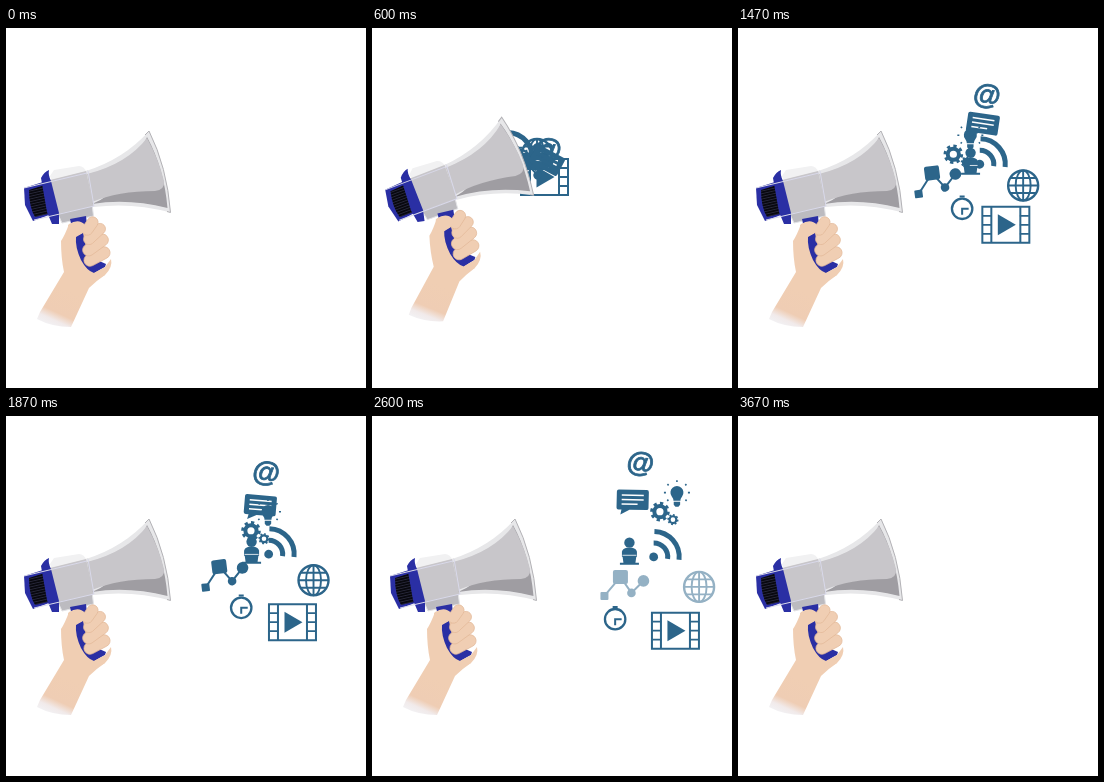
These frames come from a looping animation (360 by 360 pixels, 4070 ms). An HTML page:

```html
<!DOCTYPE html>
<html lang="en">
<head>
<meta charset="utf-8">
<title>Megaphone</title>
<style>
  html, body { margin: 0; width: 100%; height: 100%; overflow: hidden; background: #fff; }
  svg { display: block; width: 100vw; height: 100vh; }
  #icons { --ink: #2c658a; fill: var(--ink); stroke: none; }
  .line { fill: none; stroke: var(--ink); }
  .paper { fill: none; stroke: #fff; }
  .blue { fill: #2a2fa4; }
  #at text { font: bold 28px "Liberation Sans", Arial, sans-serif; text-anchor: middle; stroke: var(--ink); stroke-width: .8px; }
  #icons > g { opacity: 0; }
</style>
</head>
<body>
<svg viewBox="0 0 360 360">
  <defs>
    <linearGradient id="skin" gradientUnits="userSpaceOnUse" x1="62" y1="262" x2="46" y2="297">
      <stop offset="0" stop-color="#f0ceb3"/>
      <stop offset=".65" stop-color="#efcdb4"/>
      <stop offset=".86" stop-color="#f1eaea"/>
      <stop offset="1" stop-color="#f2f0f2"/>
    </linearGradient>
    <pattern id="grille" width="4" height="2.6" patternUnits="userSpaceOnUse" patternTransform="rotate(-13)">
      <rect width="4" height="2.6" fill="#08080f"/>
      <rect width="4" height=".6" fill="#34344c"/>
    </pattern>
    <mask id="lines" maskUnits="userSpaceOnUse" x="-20" y="-20" width="40" height="40">
      <rect x="-20" y="-20" width="40" height="40" fill="#fff"/>
      <path stroke="#000" stroke-width="1.5" d="M-11-6.5H11M-11-2H11M-11 2.5H5"/>
    </mask>
  </defs>

  <g id="icons">
    <g id="film">
      <path class="line" stroke-width="2" d="M-23.5-18H23.5V18H-23.5ZM-14.5-18V18M14.5-18V18"/>
      <path class="line" stroke-width="1.8" d="M-23-9h9M-23 0h9M-23 9h9M14-9h9M14 0h9M14 9h9"/>
      <path d="M-8-10.500 10 0-8 10.500Z"/>
    </g>
    <g id="globe">
      <g class="line" stroke-width="1.900">
        <circle r="15" stroke-width="2.400"/>
        <ellipse rx="7.500" ry="15"/>
        <path d="M0-15V15M-15 0H15M-13-7.500H13M-13 7.500H13"/>
      </g>
    </g>
    <g id="at"><text y="8">@</text></g>
    <g id="net">
      <path class="line" stroke-width="2" d="M-16 19 0 0 11 16 23 4"/>
      <rect x="-20" y="15" width="8" height="8" rx="1"/>
      <rect x="-7.500" y="-7" width="15" height="14" rx="2"/>
      <circle cx="11" cy="16" r="4.300"/>
      <circle cx="23" cy="4" r="5.800"/>
    </g>
    <g id="clock">
      <circle class="line" r="10.200" stroke-width="2.300"/>
      <path class="line" stroke-width="2" d="M0 6V0H6.500M-2.500-12.300H2.500"/>
    </g>
    <g id="wifi">
      <circle r="4.400"/>
      <path class="line" stroke-width="5" d="M-1-14A14 14 0 0 1 14 1M-1-25.500A25.500 25.500 0 0 1 25.500 1"/>
    </g>
    <g id="person">
      <circle cy="-8" r="5.200"/>
      <path d="M-7.500 6V1Q-7-2-3-3H3Q7-2 7.500 1V6Z"/>
      <path d="M-7 5H7L6 12H9.500V14H-9.500V12H-6Z"/>
      <path class="paper" stroke-width=".8" d="M-7 4.600H7"/>
    </g>
    <g id="idea">
      <circle class="line" r="5.600" stroke-width="4"/>
      <circle class="line" r="8.300" stroke-width="3" pathLength="16" stroke-dasharray="1"/>
      <g transform="translate(13 8)">
        <circle class="line" r="3.400" stroke-width="2.200"/>
        <circle class="line" r="4.800" stroke-width="1.600" pathLength="16" stroke-dasharray="1"/>
      </g>
      <g transform="translate(17 -19)">
        <path d="M-3.500 8Q-3.500 6-5.300 3.600A6.500 6.500 0 1 1 5.300 3.600Q3.500 6 3.500 8ZM-3.200 9H3.200V12L1.500 14H-1.500L-3.200 12Z"/>
        <path class="line" stroke-width="1.600" d="M-13 0h2M-9.500-8.500l1.200 1.200M0-12.500v1.800M9.500-8.500 8.300-7.300M11 0h2M8.500 7l1.200 1.200M-8.500 7l-1.200 1.200"/>
      </g>
    </g>
    <g id="chat">
      <path mask="url(#lines)" d="M-14-12H14Q16-12 16-10V6Q16 8 14 8H-3L-12 13-11 8H-14Q-16 8-16 6V-10Q-16-12-14-12Z"/>
    </g>
  </g>

  <g id="horn">
    <path fill="#f1f1f2" d="M44 148 48 142 73 138Q78 138 81 145L46 153Z"/>
    <path fill="#bcbbc0" stroke="#e3e3e6" d="M51 184 86 176 87.500 188 56 195Z"/>
    <path fill="#c8c6ca" d="M44 152 82 142.500 89 178 51 186Z"/>
    <path fill="#e7e7e9" d="M80 143Q118 131 143 103Q161 139 164.500 184.500Q126 174 88 179Z"/>
    <path fill="#9f9da2" d="M86 176Q118 164 141 109Q158 140 161.500 180Q122 170 86 176Z"/>
    <path fill="#c8c6ca" d="M81 146Q121 136 141 110Q153 132 158 153Q159 162 149 163Q112 163 86 174Z"/>
    <path fill="none" stroke="#b3b2b6" stroke-width="1" d="M139 107 143 103Q161 139 164.500 184.500L161 183.500"/>
    <path class="blue" d="M18 160 37 154 43 187 27 193 19 177Z"/>
    <path fill="url(#grille)" d="M23 162 37 157.500 42 186 29 189Q23 179 23 162Z"/>
    <path class="blue" d="M35 150Q38 144 43 142Q42 147 45 153L53 185 53 196 46 196 41 184Z"/>
    <path fill="none" stroke="#d9d9ea" stroke-width="1" d="M18 160 81 145M28 192 88 178M82 143 88 178"/>
  </g>

  <g id="hand">
    <path class="blue" d="M64 191 80 188 81 197 66 200Z"/>
    <path fill="url(#skin)" d="M63 196Q73 190 79 197L83 202 92 242 99 247Q90 253 83 260L65 299Q46 299 31 291L34 284 58 244Q55 230 55 213Q59 207 63 196Z"/>
    <path class="blue" d="M70 209 77 205 82 228 100 236 99 239 88 245Q81 243 75 232Q69 219 70 209Z"/>
    <g fill="#f0ceb3" stroke="#e3b999" stroke-width=".7">
      <rect x="-14" y="-6" width="28" height="12" rx="6" transform="translate(91 228.500) rotate(-28)"/>
      <rect x="-14.500" y="-6" width="29" height="12" rx="6" transform="translate(89.500 217) rotate(-36)"/>
      <rect x="-13" y="-5.500" width="26" height="11" rx="5.500" transform="translate(88.500 206) rotate(-43)"/>
      <rect x="-10" y="-5.500" width="20" height="11" rx="5.500" transform="translate(84 198) rotate(-55)"/>
    </g>
    <path fill="#f0ceb3" d="M88 245 99 239 105 231Q107 239 99 247L86 254Z"/>
    <path fill="#f0ceb3" d="M62 197Q72 191 80 198Q79 205 72 207Q66 210 64 219Z"/>
  </g>
</svg>
<script>
const LOOP = 4070, FPS = 15, FADE = 0.5;
const $ = id => document.getElementById(id);

// Eased value between [time, value] stops.
function along(t, stops) {
  if (t <= stops[0][0]) return stops[0][1];
  for (let i = 1; i < stops.length; i++) {
    const [t0, a] = stops[i - 1], [t1, b] = stops[i];
    if (t < t1) {
      const u = (t - t0) / (t1 - t0);
      return a + (b - a) * u * u * (3 - 2 * u);
    }
  }
  return stops[stops.length - 1][1];
}

// Share of the flight still ahead; 1 at 0.6 s.
function left(t) {
  const s = t - 0.6;
  return s < 0 ? 1 - 0.95 * s : Math.exp(-(1.35 * s + 0.0215 * s ** 4));
}

const fly = (from, to, px = 1, py = 1) => t => [
  to[0] + (from[0] - to[0]) * left(t) ** px,
  to[1] + (from[1] - to[1]) * left(t) ** py
];
const ahead = t => Math.max(0, 3.67 - t);

const icons = {
  film:   { at: fly([172.5, 149], [310, 218]), fade: 3.1 },
  globe:  { at: fly([165, 126], [334, 174], 1.05, 0.9), fade: 2.35 },
  at:     { at: fly([176, 122], [270.5, 44], 1.25), fade: 2.78, turn: () => 8 },
  net:    { at: t => [175 + 48 * (t - 1.07), 139.5 + 14 * (t - 1.07)], fade: 2.35,
            turn: t => along(t, [[1.07, -8], [1.87, -7], [2.6, 0]]) },
  clock:  { at: fly([148, 132], [245, 209], 1.3, 0.85), fade: 2.92 },
  wifi:   { at: fly([135, 130], [289, 144], 1, 0.5), fade: 3.07, turn: () => 4 },
  person: { at: fly([166, 128], [262, 135]), fade: 3.02 },
  idea:   { at: t => [318 - 26.8 * ahead(t) ** 1.7, 76 + 18 * ahead(t) ** 1.3], fade: 2.92 },
  chat:   { at: fly([174, 134], [262, 84], 1.37, 1.1), fade: 2.85, turn: t => 28 * left(t) }
};

const hornTurn = [[0, 0], [0.467, -11.5], [0.667, -6], [1.067, -2], [1.333, 0]];
const hornPush = [[0, 0], [0.467, 3], [0.6, 0]];
const handTurn = [[0, 0], [0.467, -3.8], [0.667, -2], [1, 0]];

function draw(t) {
  $("horn").setAttribute("transform",
    `translate(${along(t, hornPush)} 0) rotate(${along(t, hornTurn)} 30 198)`);
  $("hand").setAttribute("transform", `rotate(${along(t, handTurn)} -63 155)`);
  for (const [id, { at, fade, turn }] of Object.entries(icons)) {
    const g = $(id), [x, y] = at(t);
    g.setAttribute("transform", `translate(${x} ${y}) rotate(${turn ? turn(t) : 0})`);
    g.style.opacity = t < 0.43 ? 0 : Math.min(1, Math.max(0, 1 - (t - fade) / FADE));
  }
}

const start = performance.now();
function tick() {
  const ms = (performance.now() - start) % LOOP;
  draw(Math.floor(ms * FPS / 1000 + 0.06) / FPS);
  requestAnimationFrame(tick);
}
draw(0);
requestAnimationFrame(tick);
</script>
</body>
</html>
```
